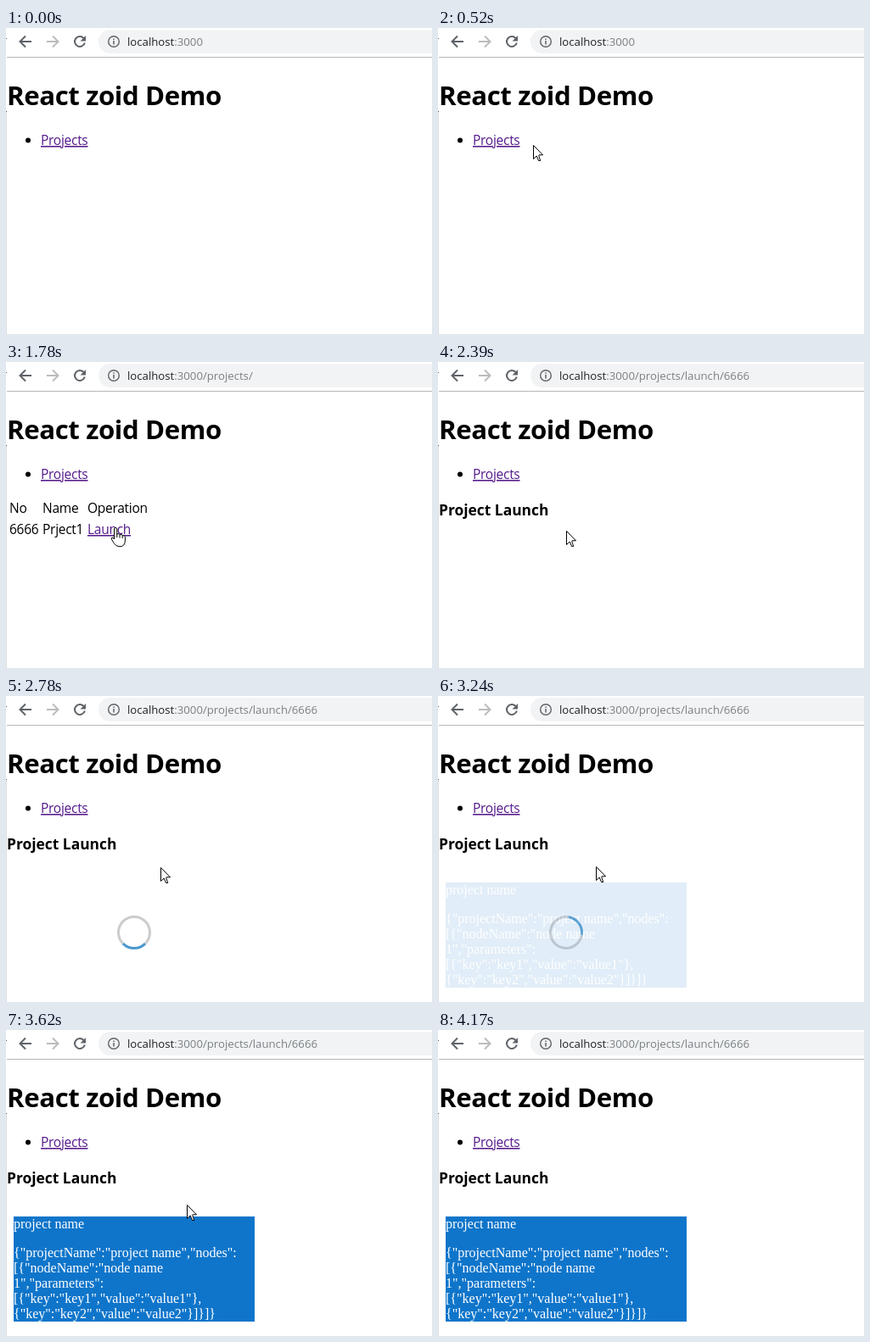
Animation, 502 px wide and 361 px high, one loop 5180 ms. Source, as an HTML page:

```html
<!DOCTYPE html>
<html lang="en">
<head>
<meta charset="utf-8">
<title>React zoid Demo</title>
<style>
html, body { margin: 0; width: 100%; height: 100%; overflow: hidden; background: #fff; }
svg { display: block; font: 15.5px "Open Sans", "Noto Sans", sans-serif; letter-spacing: -.26px; }
.icon { fill: none; stroke: #5f6368; stroke-width: 2; }
.url { font-size: 13.2px; letter-spacing: 0; fill: #202124; }
.url tspan { fill: #7b8085; }
.link { fill: #551a8b; text-decoration: underline 1px; text-underline-offset: 2px; }
.link.active { fill: #f00; }
.h1 { font-size: 31.2px; font-weight: 700; letter-spacing: -.4px; }
.h3 { font-size: 17.4px; font-weight: 700; letter-spacing: 0; }
.json { font: 16px "Liberation Serif", "Times New Roman", serif; letter-spacing: 0; fill: #fff; }
.ring { fill: none; stroke-width: 3; }
.cursor { fill: #fff; stroke: #000; stroke-linejoin: round; }
</style>
</head>
<body>
<svg width="502" height="361" viewBox="0 0 502 361">
  <path d="M.5 98V361" stroke="#dedede"/>
  <path d="M0 12.5h1M0 98.5h1" stroke="#555"/>
  <path d="M1 34.5H502" stroke="#b6b6b6"/>
  <rect x="109" y="2" width="420" height="28" rx="14" fill="#f1f3f4"/>
  <path class="icon" d="M30 16H17.5M23 9.5L16.5 16 23 22.5"/>
  <path class="icon" d="M48 16H60.5M55 9.5L61.5 16 55 22.5" style="stroke:#babcbe"/>
  <path class="icon" d="M91.500 12A6 6 0 1 0 92.800 17.500"/>
  <path d="M94 9V15.500H87.500z" fill="#5f6368"/>
  <circle class="icon" cx="127" cy="16" r="6.300" style="stroke-width:1.400"/>
  <path class="icon" d="M127 15V19.500M127 12.400V14" style="stroke-width:1.500"/>
  <text class="url" x="143" y="21">localhost<tspan>:3000</tspan><tspan id="path"></tspan></text>

  <text class="h1" x="1" y="91">React zoid Demo</text>
  <circle cx="26" cy="132.500" r="3"/>
  <text class="link" id="projects" x="41" y="138">Projects</text>

  <g id="list">
    <text x="4" y="178">No</text>
    <text x="43" y="178">Name</text>
    <text x="96" y="178">Operation</text>
    <text x="4" y="203">6666</text>
    <text x="43" y="203">Prject1</text>
    <text class="link" id="launch" x="96" y="203">Launch</text>
  </g>

  <g id="detail">
    <text class="h3" x="1" y="181">Project Launch</text>
    <g id="spinner">
      <circle class="ring" cx="151" cy="279" r="18.500" pathLength="4" stroke="#ccc" stroke-dasharray="3 1" stroke-dashoffset="-1"/>
      <circle class="ring" cx="151" cy="279" r="18.500" pathLength="4" stroke="#4d99cd" stroke-dasharray="1 3"/>
    </g>
    <g id="panel">
      <rect x="9" y="220" width="284" height="124" fill="#0f75ca"/>
      <text class="json" y="234">
        <tspan x="9">project name</tspan>
        <tspan x="9" dy="34">{"projectName":"project name","nodes":</tspan>
        <tspan x="9" dy="18">[{"nodeName":"node name</tspan>
        <tspan x="9" dy="18">1","parameters":</tspan>
        <tspan x="9" dy="18">[{"key":"key1","value":"value1"},</tspan>
        <tspan x="9" dy="18">{"key":"key2","value":"value2"}]}]}</tspan>
      </text>
    </g>
  </g>

  <g id="pointer">
    <circle id="press" cx=".5" r="12.800" fill="#ff0" fill-opacity=".5"/>
    <path class="cursor" id="arrow" d="M.5 .5V16.500L4.200 13 6.500 18.500H8.700L6.700 12.500 7 11.800H11.500z"/>
    <g id="hand">
      <path class="cursor" d="M-1.500 14V2Q-1.400 .5 .2 .5 1.700 .5 1.800 2V8Q4.800 6.800 5 8.800 8 7.600 8.200 9.800 11.300 9 11.400 11.600V15Q11.400 22.800 5 22.800 .5 22.800 -2 18.500L-4.300 14.600Q-5.100 12.700 -4 12.100 -2.900 11.600 -1.500 14"/>
      <path class="cursor" d="M1.800 8V12M5 8.800V12.500M8.200 9.800V13"/>
    </g>
  </g>
</svg>
<script>
const LOOP = 5180, STEP = 76;
const PRESS = 70, VISIT_LIST = 1140, VISIT_DETAIL = 2390, LOADING = 2780, READY = 3190;
const ENTER = 150, LEAVE = 4170;

// Where the pointer goes next, and when it sets out and arrives
const stops = [
  { x: 720, y: 657, start: 0, end: 0 },
  { x: 227, y: 164, start: ENTER, end: 290 },
  { x: 80, y: 131, start: 440, end: 750 },
  { x: 133, y: 154, start: VISIT_LIST, end: 1370 },
  { x: 129, y: 197, start: 1540, end: 1930 },
  { x: 182, y: 202, start: VISIT_DETAIL, end: LOADING },
  { x: 186, y: 201, start: 2850, end: 3310 },
  { x: 213, y: 206, start: 3390, end: 3620 },
  { x: 229, y: 210, start: 3770, end: 3850 },
  { x: 272, y: 328, start: 4020, end: LEAVE }
];

const $ = id => document.getElementById(id);
const show = (id, on) => $(id).setAttribute('display', on ? 'inline' : 'none');
const clamp = v => Math.max(0, Math.min(1, v));
const easeOut = k => 1 - (1 - k) ** 3;
const easeInOut = k => k * k * (3 - 2 * k);

function pointerAt(t) {
  const n = stops.findLastIndex(s => s.start <= t);
  const to = stops[n], from = stops[n - 1] || to;
  const count = Math.round((to.end - to.start) / STEP) || 1;
  const gap = (to.end - to.start) / count;
  const i = gap ? Math.min(count, Math.floor((t - to.start) / gap + .05)) : 0;
  const e = easeOut((i + 1) / (count + 1));
  return {
    x: Math.round(from.x + (to.x - from.x) * e),
    y: Math.round(from.y + (to.y - from.y) * e),
    time: to.start + i * gap
  };
}

const inside = (p, x, y, w, h) => p.x >= x && p.x <= x + w && p.y >= y && p.y <= y + h;
const pressed = (t, visit) => t >= visit - PRESS - 10 && t < visit;

function draw(t) {
  const p = pointerAt(t);
  const page = (t >= VISIT_LIST) + (t >= VISIT_DETAIL);
  const press1 = pressed(t, VISIT_LIST + 5), press2 = pressed(t, VISIT_DETAIL);
  const overLink = inside(p, 41, 122, 56, 21) || page === 1 && inside(p, 96, 187, 50, 21);

  $('path').textContent = ['', '/projects/', '/projects/launch/6666'][page];
  $('projects').classList.toggle('active', press1 && page === 0);
  $('launch').classList.toggle('active', press2);
  show('list', page === 1);
  show('detail', page === 2);

  const fade = easeInOut(clamp((p.time - READY) / 200));
  const angle = 45 + (p.time - LOADING) / 700 * 360;
  show('spinner', t >= LOADING && fade < 1);
  $('spinner').setAttribute('opacity', 1 - fade);
  $('spinner').setAttribute('transform', `rotate(${angle} 151 279)`);
  $('panel').setAttribute('opacity', fade);

  show('pointer', t >= ENTER && t < LEAVE);
  show('press', press1 && page === 0 || press2);
  show('arrow', !overLink);
  show('hand', overLink);
  $('pointer').setAttribute('transform', `translate(${p.x} ${p.y})`);
}

const begin = performance.now();
function tick() {
  draw((performance.now() - begin) % LOOP);
  requestAnimationFrame(tick);
}
tick();
</script>
</body>
</html>
```
